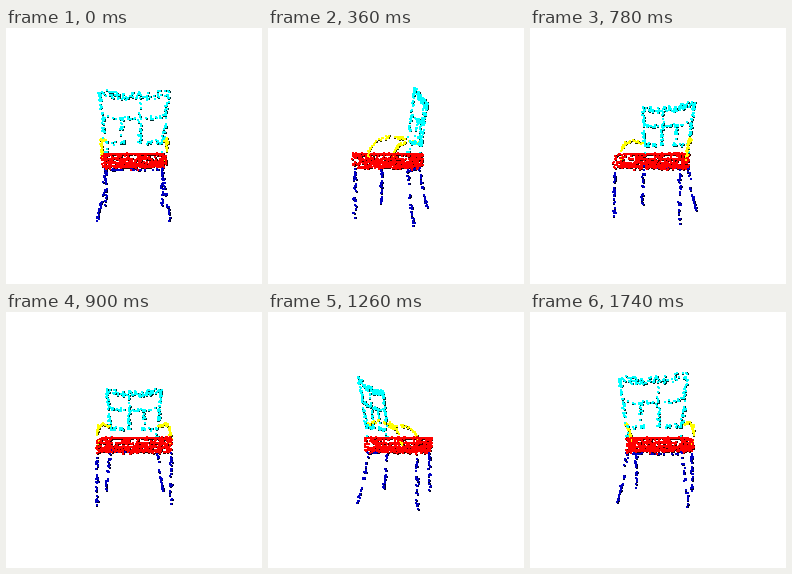
Write a matplotlib script that moves like this. It is 256 px wide and 256 px high and loops after 1800 ms.

```python
import numpy as np
import matplotlib.pyplot as plt
from matplotlib.animation import FuncAnimation
from matplotlib.colors import to_rgb

SIZE, DPI = 256, 100
FRAMES, INTERVAL = 30, 60
EYE = 212  # camera distance, in pixels
DOT = (2 * 72 / DPI) ** 2  # marker area of a two-pixel square
BLUE = "#0000c4"
rng = np.random.default_rng(7)

# Axes: x to the right, y up, z towards the rear of the chair.
parts = []


def add(points, color, jitter=0.9):
    points = np.asarray(points, float)
    noise = rng.uniform(-jitter, jitter, points.shape)
    parts.append((points + noise, color))


def spread(lo, hi, n):
    return rng.uniform(lo, hi, n)


def polyline(knots, n):
    knots = np.asarray(knots, float)
    length = np.linalg.norm(np.diff(knots, axis=0), axis=1)
    pos = np.r_[0, np.cumsum(length)]
    t = spread(0, pos[-1], n)
    return np.column_stack([np.interp(t, pos, knots[:, i]) for i in range(3)])


def on_back(x, y):
    """Place points on the leaning, slightly curved backrest."""
    f = np.clip(y / 58, 0, 1)
    z = 19 + 7 * f ** 1.3 + 2 * (1 - x ** 2)
    return np.column_stack([x * (26 + 5.5 * f), y - 3 * f * (1 - x ** 2), z])


def seat_width(z):
    return 32 - 6 * np.clip((z + 31) / 53, 0, 1) ** 1.5


def seat_plane(y, n):
    z = spread(-31, 22, n)
    x = spread(-1, 1, n) * seat_width(z)
    return np.column_stack([x, np.full(n, y), z])


def seat_wall(n):
    z = spread(-31, 22, n)
    side = rng.choice([-1, 1], n) * seat_width(z)
    edge = rng.choice([-31, 22], n)
    across = spread(-1, 1, n) * seat_width(edge)
    ends = rng.random(n) < 0.5
    x = np.where(ends, across, side)
    return np.column_stack([x, spread(-12, 2, n), np.where(ends, edge, z)])


# Seat
for level, count in ((2, 150), (-3, 60), (-7, 90), (-10.5, 140)):
    add(seat_plane(level, count), "red", 0.4)
add(seat_wall(230), "red", 0.4)
add(polyline([(-26, -12.5, 20), (26, -12.5, 20)], 26), BLUE, 0.4)

# Backrest: crest, posts, rails and slats
add(on_back(spread(-1, 1, 75), spread(52, 58.5, 75)), "cyan")
for side in (-1, 1):
    add(on_back(side * spread(0.93, 1, 42), spread(3, 58, 42)), "cyan")
add(on_back(spread(-0.9, 0.95, 30), spread(33.5, 36, 30)), "cyan")
add(on_back(spread(0.15, 0.22, 24), spread(12, 54, 24)), "cyan")
add(on_back(spread(-0.42, -0.34, 14), spread(12, 35, 14)), "cyan")
add(on_back(spread(0.4, 0.95, 14), spread(11, 14, 14)), "cyan")
add(on_back(spread(-0.95, -0.3, 10), spread(11, 14, 10)), "cyan")

# Arms and legs
for side in (-1, 1):
    arm = [(26, 14, 18), (30, 16, 11), (33, 16.5, 3), (34, 13.5, -6),
           (34, 8, -12), (34, 2, -15), (34, -3, -15)]
    add(polyline(arm, 40) * (side, 1, 1), "yellow", 1.2)
    add(polyline([(34, 2, -14), (34, -11, -14)], 9) * (side, 1, 1), "red")
    front = [(32, -11, -28), (32, -56, -29)]
    rear = [(25.5, -11, 19), (28, -33, 21), (32, -57.5, 26)]
    for leg in (front, rear):
        add(polyline(leg, 27) * (side, 1, 1), BLUE, 1.1)

cloud = np.vstack([p for p, _ in parts])
colors = np.vstack([[to_rgb(c)] * len(p) for p, c in parts])


def project(angle):
    x, y, z = cloud.T
    c, s = np.cos(angle), np.sin(angle)
    depth = z * c - x * s
    scale = EYE / (EYE - depth)
    across = (x * c + z * s) * scale
    order = np.argsort(depth)
    xy = SIZE / 2 + np.column_stack([across, y * scale])
    return xy[order], colors[order]


fig = plt.figure(figsize=(SIZE / DPI, SIZE / DPI), dpi=DPI, facecolor="white")
ax = fig.add_axes([0, 0, 1, 1])
ax.set(xlim=(0, SIZE), ylim=(0, SIZE))
ax.axis("off")


def layer():
    return ax.scatter(*cloud[:, :2].T, s=DOT, c=colors, marker="s",
                      linewidths=0, antialiased=False)


shade, dots = layer(), layer()


def update(i):
    xy, tint = project(2 * np.pi * i / FRAMES)
    # Whole pixels keep every dot crisp; the shaded rim peeks out below.
    dots.set_offsets(np.round(xy))
    dots.set_facecolor(tint)
    shade.set_offsets(np.round(xy + (0.5, -0.5)))
    shade.set_facecolor(tint * 0.2)
    return shade, dots


anim = FuncAnimation(fig, update, frames=FRAMES, interval=INTERVAL, repeat=True)
plt.show()
```
